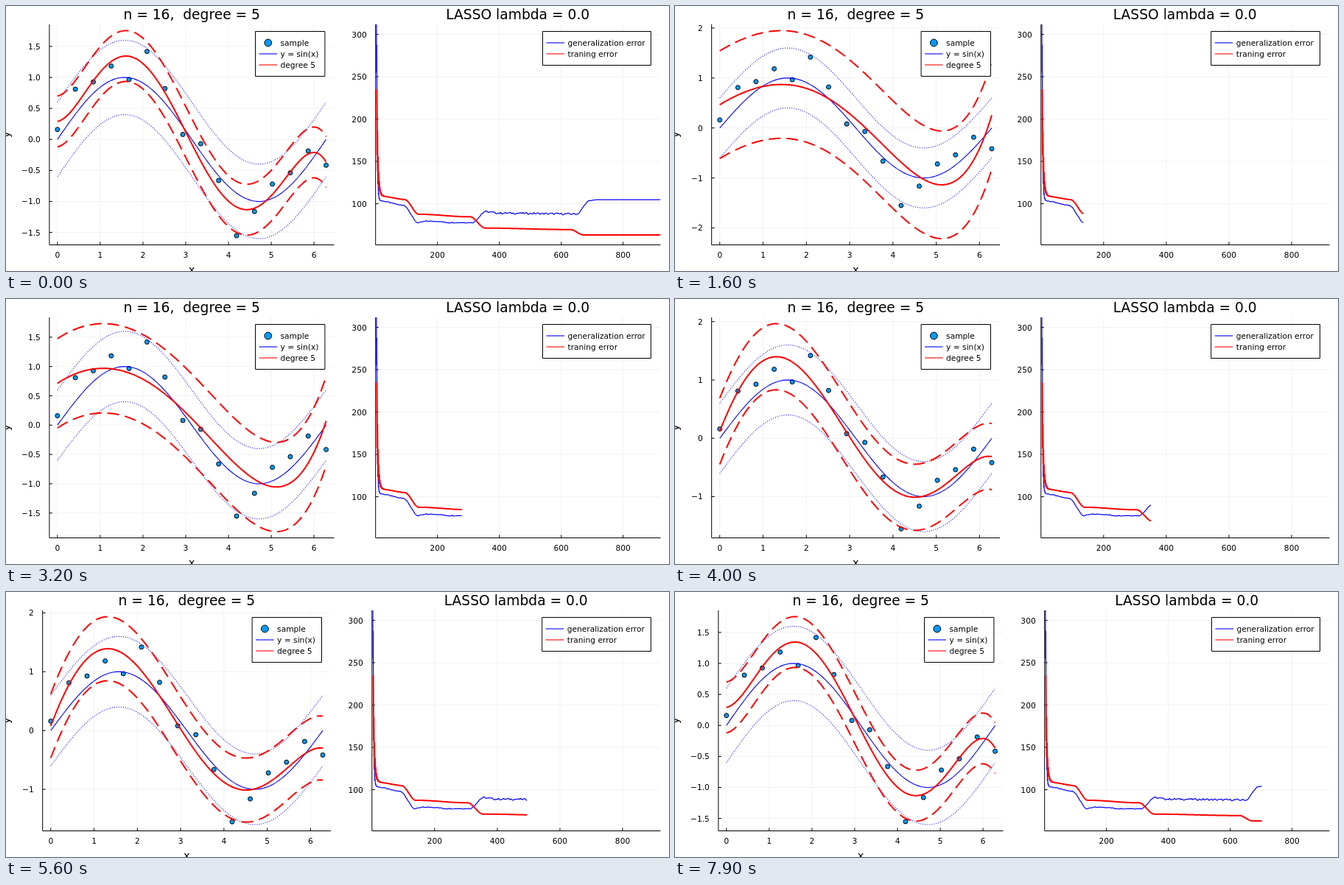
Write an HTML page with a canvas that moves like this. It is 900x360 px and loops after 8000 ms.

```html
<!DOCTYPE html>
<html>
<head>
<meta charset="utf-8">
<style>
html, body { margin: 0; width: 100%; height: 100%; overflow: hidden; background: #fff; }
canvas { display: block; }
</style>
</head>
<body>
<canvas id="stage" width="900" height="360"></canvas>
<script>
const ctx = document.getElementById('stage').getContext('2d');
const TOP = 25, BOTTOM = 324.5, END = 921, X_MAX = 2 * Math.PI;
const BLUE = '#0000ff', RED = '#ff0000';

const samples = [.16, .81, .927, 1.183, .966, 1.418, .82, .08,
  -.07, -.663, -1.552, -1.163, -.72, -.538, -.186, -.417];

// The fit eases into each state between two steps: half band width, curve at six even nodes
const states = [
  { from: 0, to: 20, band: 2, nodes: [.02, .015, -.028, -.165, -.455, -.97] },
  { from: 75, to: 135, band: 1.077, nodes: [.465, .864, .587, -.338, -1.13, .255] },
  { from: 150, to: 279, band: .762, nodes: [.713, .962, .531, -.373, -1.05, .07] },
  { from: 305, to: 355, band: .563, nodes: [.11, 1.405, .588, -.741, -.883, -.32] },
  { from: 432, to: 576, band: .517, nodes: [.03, 1.366, .59, -.722, -.895, -.27] },
  { from: 620, to: 672, band: .41, nodes: [.29, 1.256, .756, -.818, -.888, -.365] }
];

const smooth = (from, to, s) => {
  const u = Math.min(1, Math.max(0, (s - from) / (to - from)));
  return u * u * (3 - 2 * u);
};

function fitAt(s) {
  let band = .48, nodes = Array(6).fill(0);
  for (const state of states) {
    const w = smooth(state.from, state.to, s), mix = (a, b) => a + (b - a) * w;
    band = mix(band, state.band);
    nodes = nodes.map((v, i) => mix(v, state.nodes[i]));
  }
  return { band, nodes };
}

// Quintic through the nodes
function quintic(nodes, x) {
  const u = x / X_MAX * 5;
  return nodes.reduce((sum, v, i) => {
    for (let j = 0; j < 6; j++) if (j !== i) v *= (u - j) / (i - j);
    return sum + v;
  }, 0);
}

// Error levels: a zigzag decay at first, then eased changes [from, to, amount]
const ramps = (s, list) => list.reduce((sum, [from, to, d]) => sum + d * smooth(from, to, s), 0);
const decay = (s, size, length) => size * Math.exp(-s / length) * (s % 2 ? .5 : 1);

function random(n) {
  const r = Math.sin(n * 12.9898) * 43758.5453;
  return (r - Math.floor(r)) * 2 - 1;
}

function jitter(s) {
  const i = Math.floor(s / 4), u = s / 4 - i;
  const size = .5 * smooth(0, 20, s) + .6 * smooth(320, 350, s) - 1.1 * smooth(660, 715, s);
  return size * (random(i) * (1 - u) + random(i + 1) * u);
}

const trainingAt = s => 109 + decay(s - 4, 126, 4) + ramps(s, [
  [10, 110, -4.5], [95, 140, -17], [145, 300, -2.9],
  [305, 355, -13.4], [360, 620, -1.7], [630, 672, -6.3]]);

const generalAt = s => 103.5 + decay(s - 2, 500, 2) + jitter(s) + ramps(s, [
  [10, 95, -5.5], [90, 138, -20.5], [135, 165, 1.8], [190, 240, -1.6], [312, 355, 12.8],
  [355, 400, -1.6], [400, 650, -1], [650, 690, 15], [680, 715, 1.8]]);

function stroke(points, color, width, dash = []) {
  ctx.beginPath();
  points.forEach(p => ctx.lineTo(p[0], p[1]));
  ctx.strokeStyle = color;
  ctx.lineWidth = width;
  ctx.setLineDash(dash);
  ctx.stroke();
  ctx.setLineDash([]);
}

function text(str, x, y, align = 'left', size = 10.67) {
  ctx.font = size + 'px "DejaVu Sans", sans-serif';
  ctx.textAlign = align;
  ctx.fillStyle = '#000';
  ctx.fillText(str, x, y);
}

function dot(x, y, r) {
  ctx.beginPath();
  ctx.arc(x, y, r, 0, 7);
  ctx.fillStyle = '#009af9';
  ctx.fill();
  ctx.strokeStyle = '#000';
  ctx.lineWidth = 1;
  ctx.stroke();
}

function axes(left, right, xTicks, yTicks, X, Y, label) {
  const grid = '#f1f1f1';
  xTicks.forEach(v => stroke([[X(v), TOP], [X(v), BOTTOM]], grid, 1));
  yTicks.forEach(v => stroke([[left, Y(v)], [right, Y(v)]], grid, 1));
  stroke([[left, TOP], [left, BOTTOM], [right, BOTTOM]], '#000', 1);
  xTicks.forEach(v => {
    stroke([[X(v), BOTTOM], [X(v), BOTTOM - 4]], '#000', 1);
    text(v, X(v), 341.5, 'center');
  });
  yTicks.forEach(v => {
    stroke([[left, Y(v)], [left + 4, Y(v)]], '#000', 1);
    text(label(v), left - 12, Y(v) + 4, 'right');
  });
}

function clipped(left, right, paint) {
  ctx.save();
  ctx.beginPath();
  ctx.rect(left, TOP, right - left, BOTTOM - TOP);
  ctx.clip();
  paint();
  ctx.restore();
}

function legend(x, right, rows) {
  const h = 16 + 15 * rows.length;
  ctx.fillStyle = '#fff';
  ctx.fillRect(x, 34.5, right - x, h);
  ctx.strokeStyle = '#000';
  ctx.lineWidth = 1;
  ctx.strokeRect(x, 34.5, right - x, h);
  rows.forEach(([name, color], i) => {
    const y = 50 + 15 * i;
    if (color) stroke([[x + 5, y], [x + 29.5, y]], color, 1.1);
    else dot(x + 17.3, y, 4.9);
    text(name, x + 34, y + 4);
  });
}

function drawFit(s) {
  const { band, nodes } = fitAt(s);
  const xs = Array.from({ length: 121 }, (_, i) => i / 120 * X_MAX);
  const curve = xs.map(x => quintic(nodes, x));
  let low = Math.min(-1.6, ...curve.map(v => v - band));
  let high = Math.max(1.6, ...curve.map(v => v + band));
  const pad = .03 * (high - low);
  low -= pad;
  high += pad;

  const wide = low > -2 && high < 2;
  const left = wide ? 58.9 : 49.7, right = wide ? 445.5 : 441.1, mid = (left + right) / 2;
  const X = x => left + (x / X_MAX + .03) / 1.06 * (right - left);
  const Y = y => BOTTOM - (y - low) / (high - low) * (BOTTOM - TOP);
  const gap = wide ? .5 : 1, ticks = [];
  for (let v = Math.ceil(low / gap) * gap; v <= high; v += gap) ticks.push(v);
  const label = v => (v < 0 ? '\u2212' : '') + Math.abs(v).toFixed(wide ? 1 : 0);

  axes(left, right, [0, 1, 2, 3, 4, 5, 6], ticks, X, Y, label);
  clipped(left, right, () => {
    const line = (f, ...style) => stroke(xs.map((x, i) => [X(x), Y(f(x, i))]), ...style);
    samples.forEach((v, i) => dot(X(i / 15 * X_MAX), Y(v), 3));
    line(Math.sin, BLUE, 1.1);
    for (const d of [.6, -.6]) line(x => Math.sin(x) + d, BLUE, 1.1, [1, 2]);
    line((x, i) => curve[i], RED, 2);
    for (const d of [band, -band]) line((x, i) => curve[i] + d, RED, 2, [16, 8]);
  });
  legend(right - 107, right - 12.6, [['sample'], ['y = sin(x)', BLUE], ['degree 5', RED]]);
  text('n = 16,  degree = 5', mid, 18, 'center', 18.67);
  text('x', mid, 363, 'center', 14.67);
  ctx.save();
  ctx.translate(5, 174.7);
  ctx.rotate(-Math.PI / 2);
  text('y', 0, 0, 'center', 14.67);
  ctx.restore();
  return wide;
}

function drawErrors(s, wide) {
  const left = wide ? 501.7 : 496.8, right = 888.5;
  const X = v => left + v / END * (right - left);
  const Y = v => 268.6 - (v - 100) * 1.1505;
  const trace = (f, from) => {
    const points = [];
    for (let i = from; i <= s; i++) points.push([X(i), Y(f(i))]);
    return points;
  };
  axes(left, right, [200, 400, 600, 800], [100, 150, 200, 250, 300], X, Y, v => v);
  clipped(left, right, () => {
    stroke(trace(generalAt, 2), BLUE, 1.2);
    stroke(trace(trainingAt, 4), RED, 2);
  });
  legend(wide ? 728.5 : 727.7, 875.5, [['generalization error', BLUE], ['traning error', RED]]);
  text('LASSO lambda = 0.0', (left + right) / 2 - .4, 18, 'center', 18.67);
}

function draw(now) {
  const tick = Math.floor(now / 100) % 80;
  const step = tick ? 9 * (tick - 1) : END;
  ctx.fillStyle = '#fff';
  ctx.fillRect(0, 0, 900, 360);
  ctx.lineJoin = 'round';
  drawErrors(step, drawFit(step));
}

const start = performance.now();
function loop() {
  draw(performance.now() - start);
  requestAnimationFrame(loop);
}
loop();
</script>
</body>
</html>
```
